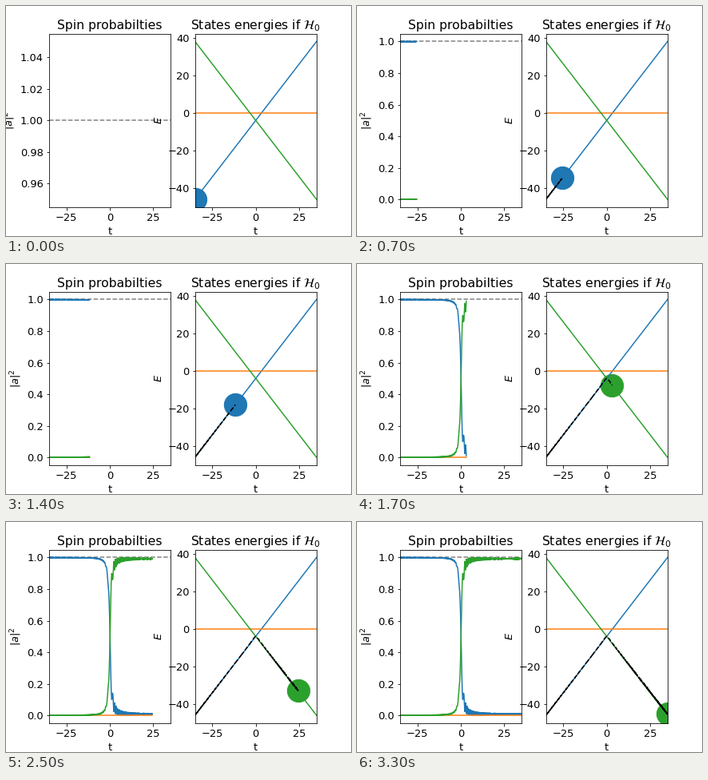
A matplotlib script that plays this animation: 432 by 288 pixels, repeating every 3.4 s.

```python
import numpy as np
import matplotlib.pyplot as plt
from matplotlib.animation import FuncAnimation

FRAMES, INTERVAL = 34, 100
SUB, FINE = 30, 8               # plotted points per frame, solver steps per point
T_MAX, SLOPE, SHIFT, COUPLING = 35, 1.2, -4, 1.4
COLORS = ["C0", "C1", "C2"]

plt.rcParams.update({
    "font.size": 13,
    "figure.subplot.bottom": 0.125,
    "figure.subplot.top": 0.88,
})


def progress(t, b=5):
    """Integral of the solver's step density: steps are longest near t = 0."""
    return t * np.hypot(t, b) + b**2 * np.arcsinh(t / b)


def sample_times():
    keys = np.array([0, 7, 11, 17, 21, 25, 33])
    at = np.array([-35, -25.5, -18.7, 3.1, 16.5, 24.4, 35])
    n = np.arange((FRAMES - 1) * SUB + 1) / SUB
    grid = np.linspace(-T_MAX, T_MAX, 20001)
    return np.interp(np.interp(n, keys, progress(at)), progress(grid), grid)


def evolve(times):
    """Populations of the two crossing levels, starting in the first."""
    a, b = 1 + 0j, 0j
    probs = [(1.0, 0.0)]
    for t0, t1 in zip(times[:-1], times[1:]):
        h = (t1 - t0) / FINE
        for k in range(FINE):
            d = SLOPE * (t0 + (k + 0.5) * h)
            w = np.hypot(d, COUPLING)
            c, s = np.cos(w * h), -1j * np.sin(w * h) / w
            a, b = (c + s * d) * a + s * COUPLING * b, s * COUPLING * a + (c - s * d) * b
        probs.append((abs(a)**2, abs(b)**2))
    up, down = np.array(probs).T
    return np.array([up, np.zeros_like(up), down])


def energies(t):
    return np.array([SLOPE * t + SHIFT, 0 * t, -SLOPE * t + SHIFT])


times = sample_times()
probs = evolve(times)
mean_energy = (probs * energies(times)).sum(axis=0)

fig, (ax_p, ax_e) = plt.subplots(1, 2, figsize=(6, 4), dpi=72)

ax_p.set(title="Spin probabilties", xlabel="t", ylabel="$|a|^2$", xlim=(-T_MAX, T_MAX))
ax_p.axhline(1, color="gray", ls="--")
curves = [ax_p.plot([], [], color=c)[0] for c in COLORS]

ax_e.set(title=r"States energies if $\mathcal{H}_0$", xlabel="t", ylabel="$E$",
         xlim=(-T_MAX, T_MAX), ylim=(-50.2, 42.2))
ends = np.array([-T_MAX, T_MAX])
for e, c in zip(energies(ends), COLORS):
    ax_e.plot(ends, e, color=c)
ball = ax_e.scatter([-T_MAX], [mean_energy[0]], s=800, zorder=1)

# One dashed piece per frame, so the dash pattern restarts each time.
trail = []
for i in range(FRAMES - 1):
    part = slice(i * SUB, (i + 1) * SUB + 1)
    trail += ax_e.plot(times[part], mean_energy[part], "k--")


def update(i):
    end = i * SUB
    ax_p.set_ylim((-0.05, 1.05) if i else (0.945, 1.055))
    for curve, p in zip(curves, probs):
        curve.set_data(times[:end + 1], p[:end + 1])
        curve.set_visible(i > 0)
    for k, piece in enumerate(trail):
        piece.set_visible(k < i)
    ball.set_offsets([[times[end], mean_energy[end]]])
    ball.set_color(COLORS[probs[:, end].argmax()])
    return [*curves, *trail, ball]


anim = FuncAnimation(fig, update, frames=FRAMES, interval=INTERVAL,
                     init_func=lambda: update(0), repeat=True, repeat_delay=0)
plt.show()
```
